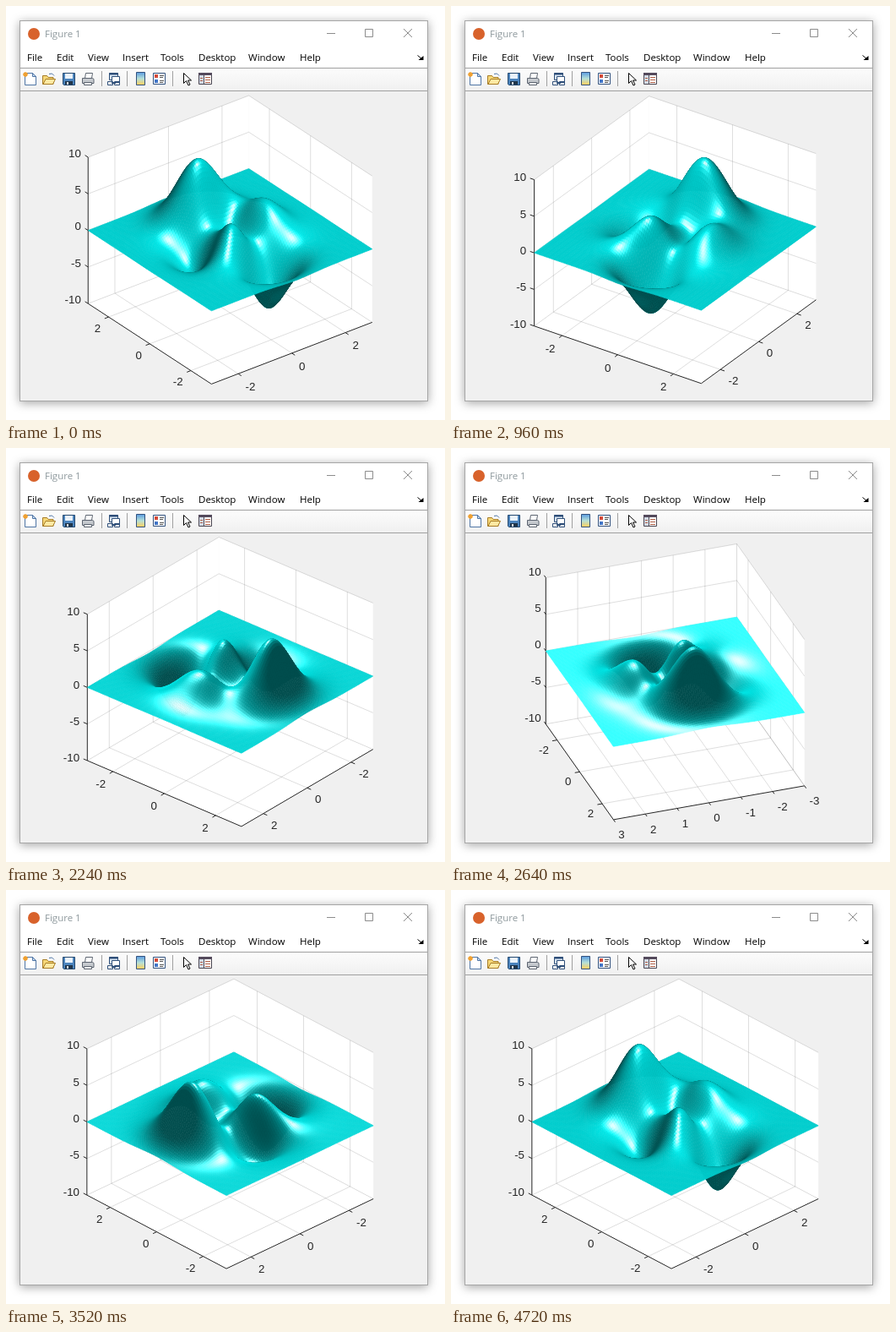
Animation of 520 by 490 pixels, one loop 4800 ms. Source, as an HTML page with a canvas:

```html
<!DOCTYPE html>
<html lang="en">
<head>
<meta charset="utf-8">
<title>Figure 1</title>
<style>
  html, body { margin: 0; width: 520px; height: 490px; overflow: hidden; background: #fff; }
  .window {
    position: absolute; left: 16px; top: 17px; width: 482px; height: 449px;
    border: 1px solid #a6a6a6; background: #f0f0f0;
    box-shadow: 0 2px 11px rgba(0, 0, 0, .36);
  }
  svg, canvas { position: absolute; left: 0; top: 0; }
  text { font: 11.5px "Open Sans", "Noto Sans", sans-serif; }
</style>
</head>
<body>
<div class="window"></div>
<svg width="520" height="490" viewBox="0 0 520 490">
  <defs>
    <linearGradient id="bar" x2="0" y2="1">
      <stop stop-color="#fcfcfc"/><stop offset="1" stop-color="#f0f0f0"/>
    </linearGradient>
    <linearGradient id="map" x2="0" y2="1">
      <stop stop-color="#5b9be0"/><stop offset=".5" stop-color="#b5e0d8"/><stop offset="1" stop-color="#ffd05a"/>
    </linearGradient>
  </defs>
  <path fill="#fff" d="M17 18h482v55H17z"/>
  <path fill="url(#bar)" d="M17 74h482v26H17z"/>
  <path stroke="#a0a0a0" d="M17 73.500h482M17 100.500h482"/>
  <circle cx="33" cy="33" r="7" fill="#d8622b"/>
  <text x="46" y="37" fill="#8e999d">Figure 1</text>
  <g fill="none" stroke="#8c8c8c">
    <path d="M380 32.500h10M425.500 27.500h9v9h-9zM471 27l10 10M481 27l-10 10"/>
  </g>
  <g id="menu"></g>
  <path d="M487.500 58.500l5 4" stroke="#000" fill="none"/>
  <path d="M494.500 59v5h-6z"/>
  <path stroke="#a0a0a0" d="M113.500 77v18M143.500 77v18M197.500 77v18"/>

  <g stroke="#4f75a5">
    <path fill="#fff" d="M22.500 79.500h9l4 4v10h-13z"/>
    <path fill="#c9dcf2" d="M31.500 79.500v4h4z"/>
    <path stroke="#f0a030" stroke-width="1.400" d="M23 78v6M20 81h6M21 79l4 4M25 79l-4 4"/>
  </g>
  <g stroke="#a77c25">
    <path fill="#f6d778" d="M43.500 92.500v-10h5l1.500 2h6v8z"/>
    <path fill="#ffe9a3" d="M44 92.500l3-6h11.500l-3 6z"/>
    <path fill="none" stroke="#4f75a5" d="M51 80.500q4-2 6 2"/>
  </g>
  <g>
    <path fill="#4c84bd" stroke="#25496f" d="M67.500 79.500h14v14h-13l-1-1z"/>
    <path fill="#eaf3fb" d="M70 80h9v6h-9z"/>
    <path fill="#20354a" d="M70 89h9v4h-9z"/>
    <path fill="#dde6ee" d="M72 90h2v3h-2z"/>
  </g>
  <g stroke="#5c6470">
    <path fill="#fff" d="M93.500 85.500l1-6h8l-1 6z"/>
    <path fill="#c5c9ce" d="M90.500 85.500h12l1.500 1v5h-13.500z"/>
    <path fill="#f3f3f3" d="M92.500 90.500h9v3h-9z"/>
  </g>
  <g stroke="#2f4f79">
    <path fill="#dbe8f7" d="M122.500 79.500h10v8h-10z"/>
    <path fill="#fff" d="M125.500 83.500h9v7h-9z"/>
    <path stroke-width="2" d="M122 80.500h11"/>
    <path fill="none" d="M120.500 89.500h6v4h-6zM128.500 89.500h6v4h-6zM125 91.500h5"/>
  </g>
  <path fill="url(#map)" stroke="#33527e" d="M154.500 78.500h10v15h-10z"/>
  <g>
    <path fill="#fff" stroke="#33527e" d="M174.500 79.500h14v13h-14z"/>
    <path fill="#d64b3a" d="M176 81h4v4h-4z"/>
    <path fill="#4377c8" d="M176 87h4v4h-4z"/>
    <path stroke="#555" d="M182 82.500h5M182 84.500h4M182 88.500h5M182 90.500h4"/>
  </g>
  <path fill="#fff" stroke="#000" d="M210.500 79.500v12l3-3 2.500 5.500 2-1-2.500-5h4z"/>
  <g>
    <path fill="#fff" stroke="#4a4550" d="M228.500 79.500h15v13h-15z"/>
    <path fill="#544a5c" d="M228 79h16v3h-16z"/>
    <path fill="#d3dbe8" d="M229 82h5v10h-5z"/>
    <path stroke="#4a4550" d="M234.500 82v11"/>
    <path stroke="#b06048" d="M236 84.500h6M236 87.500h6M236 90.500h6M230 85.500h3M230 88.500h3"/>
  </g>
</svg>
<canvas id="plot" width="520" height="490"></canvas>
<script>
const menu = { File: 25, Edit: 60, View: 97, Insert: 138, Tools: 183, Desktop: 228, Window: 287, Help: 348 };
document.getElementById('menu').innerHTML = Object.entries(menu)
  .map(([name, x]) => `<text x="${x}" y="65">${name}</text>`).join('');

const ctx = document.getElementById('plot').getContext('2d');
const CX = 265.5, CY = 276.7, UNIT = 40, EL = Math.PI / 6;
const SIN_EL = Math.sin(EL), COS_EL = Math.cos(EL);
const STEP_MS = 80, STEPS = 60;
const R = 3, Z = 10, CELLS = 99;
const LIGHT_EL = 57 * Math.PI / 180;
const LY = -Math.cos(LIGHT_EL), LZ = Math.sin(LIGHT_EL);
const AMBIENT = .3, DIFFUSE = .6, SPECULAR = .9, SHINE = 10;
const zTicks = [-10, -5, 0, 5, 10];

function peaks(x, y) {
  const x2 = x * x, y2 = y * y;
  return 3 * (1 - x) ** 2 * Math.exp(-x2 - (y + 1) ** 2)
    - 10 * (x / 5 - x ** 3 - y ** 5) * Math.exp(-x2 - y2)
    - Math.exp(-((x + 1) ** 2) - y2) / 3;
}

const coord = i => -R + 2 * R * i / CELLS;
const heights = Array.from({ length: CELLS + 1 }, (_, i) =>
  Array.from({ length: CELLS + 1 }, (_, j) => peaks(coord(i), coord(j))));

// Unit normals per cell, in the proportions of the drawn box
const normals = Array.from({ length: CELLS }, (_, i) =>
  Array.from({ length: CELLS }, (_, j) => {
    const a = heights[i][j], b = heights[i + 1][j], c = heights[i + 1][j + 1], d = heights[i][j + 1];
    const k = .25 * CELLS / (4 * R);
    const nx = (a + d - b - c) * k, ny = (a + b - c - d) * k;
    const len = Math.hypot(nx, ny, 1);
    return [nx / len, ny / len, 1 / len];
  }));

let sinA, cosA;

function project(x, y, z) {
  return [
    CX + UNIT * (x * cosA + y * sinA),
    CY - UNIT * SIN_EL * (y * cosA - x * sinA) - 10 * COS_EL * z
  ];
}

function path(...points) {
  ctx.beginPath();
  points.forEach(p => ctx.lineTo(...project(...p)));
}

function line(...points) {
  path(...points);
  ctx.stroke();
}

function face(...points) {
  path(...points);
  ctx.fill();
}

function ticksFor(facing) {
  return Math.abs(facing) > .92 ? [-3, -2, -1, 0, 1, 2, 3] : [-2, 0, 2];
}

function tick(value, from, to, upright) {
  line(from, to);
  const p = project(...from), q = project(...to);
  const len = Math.hypot(q[0] - p[0], q[1] - p[1]);
  const ux = (q[0] - p[0]) / len, uy = (q[1] - p[1]) / len;
  const beside = upright || Math.abs(uy) < .05;
  ctx.textAlign = !upright && Math.abs(ux) < .3 ? 'center' : ux < 0 ? 'right' : 'left';
  ctx.fillText(value, p[0] + 10 * ux, p[1] + 10 * uy + (beside ? 1.5 : 10.5));
}

function drawBox(nx, ny, xTicks, yTicks) {
  const fx = -nx, fy = -ny;
  ctx.fillStyle = '#fff';
  face([-R, -R, -Z], [R, -R, -Z], [R, R, -Z], [-R, R, -Z]);
  face([fx, -R, -Z], [fx, R, -Z], [fx, R, Z], [fx, -R, Z]);
  face([-R, fy, -Z], [R, fy, -Z], [R, fy, Z], [-R, fy, Z]);
  ctx.strokeStyle = 'rgba(38,38,38,.15)';
  for (const x of xTicks) line([x, ny, -Z], [x, fy, -Z], [x, fy, Z]);
  for (const y of yTicks) line([nx, y, -Z], [fx, y, -Z], [fx, y, Z]);
  for (const z of zTicks) line([nx, fy, z], [fx, fy, z], [fx, ny, z]);
}

function drawAxes(nx, ny, xTicks, yTicks) {
  const out = 1.05;
  const xOnLeft = project(-nx, ny, 0)[0] < project(nx, -ny, 0)[0];
  const left = xOnLeft ? [-nx, ny] : [nx, -ny];
  const beyond = xOnLeft ? [-nx * out, ny] : [nx, -ny * out];
  ctx.strokeStyle = ctx.fillStyle = '#262626';
  line([-nx, ny, -Z], [nx, ny, -Z], [nx, -ny, -Z]);
  line([...left, -Z], [...left, Z]);
  for (const x of xTicks) tick(x, [x, ny, -Z], [x, ny * out, -Z]);
  for (const y of yTicks) tick(y, [nx, y, -Z], [nx * out, y, -Z]);
  for (const z of zTicks) tick(z, [...left, z], [...beyond, z], true);
}

function shade([nx, ny, nz], vx, vy, vz) {
  const facing = nx * vx + ny * vy + nz * vz < 0 ? -1 : 1;
  nx *= facing; ny *= facing; nz *= facing;
  const lit = ny * LY + nz * LZ;
  let body = AMBIENT, gloss = 0;
  if (lit > 0) {
    body += DIFFUSE * lit;
    const rv = 2 * lit * (nx * vx + ny * vy + nz * vz) - LY * vy - LZ * vz;
    if (rv > 0) gloss = SPECULAR * rv ** SHINE;
  }
  const g = Math.min(255, Math.round(255 * (body + gloss)));
  return `rgb(${Math.min(255, Math.round(255 * gloss))},${g},${g})`;
}

function drawSurface(nx, ny) {
  const vx = sinA * COS_EL, vy = -cosA * COS_EL;
  const pts = heights.map((row, i) => row.map((z, j) => project(coord(i), coord(j), z)));
  ctx.lineWidth = .6;
  // Far cells first
  for (let a = 0; a < CELLS; a++) {
    const i = nx > 0 ? a : CELLS - 1 - a;
    for (let b = 0; b < CELLS; b++) {
      const j = ny > 0 ? b : CELLS - 1 - b;
      const p = pts[i][j], q = pts[i + 1][j], r = pts[i + 1][j + 1], s = pts[i][j + 1];
      ctx.fillStyle = ctx.strokeStyle = shade(normals[i][j], vx, vy, SIN_EL);
      ctx.beginPath();
      ctx.moveTo(p[0], p[1]);
      ctx.lineTo(q[0], q[1]);
      ctx.lineTo(r[0], r[1]);
      ctx.lineTo(s[0], s[1]);
      ctx.closePath();
      ctx.fill();
      ctx.stroke();
    }
  }
  ctx.lineWidth = 1;
}

function draw(step) {
  const az = (-37.5 + 360 * step / STEPS) * Math.PI / 180;
  sinA = Math.sin(az);
  cosA = Math.cos(az);
  const nx = sinA > 0 ? R : -R, ny = cosA < 0 ? R : -R;
  const xTicks = ticksFor(cosA), yTicks = ticksFor(sinA);
  ctx.clearRect(0, 0, 520, 490);
  ctx.font = '13.33px "Liberation Sans", Arial, sans-serif';
  ctx.textBaseline = 'middle';
  ctx.lineJoin = 'round';
  drawBox(nx, ny, xTicks, yTicks);
  drawAxes(nx, ny, xTicks, yTicks);
  drawSurface(nx, ny);
}

let shown = -1;
const start = performance.now();
function loop() {
  const step = Math.floor((performance.now() - start) / STEP_MS) % STEPS;
  if (step !== shown) draw(shown = step);
  requestAnimationFrame(loop);
}
loop();
</script>
</body>
</html>
```
